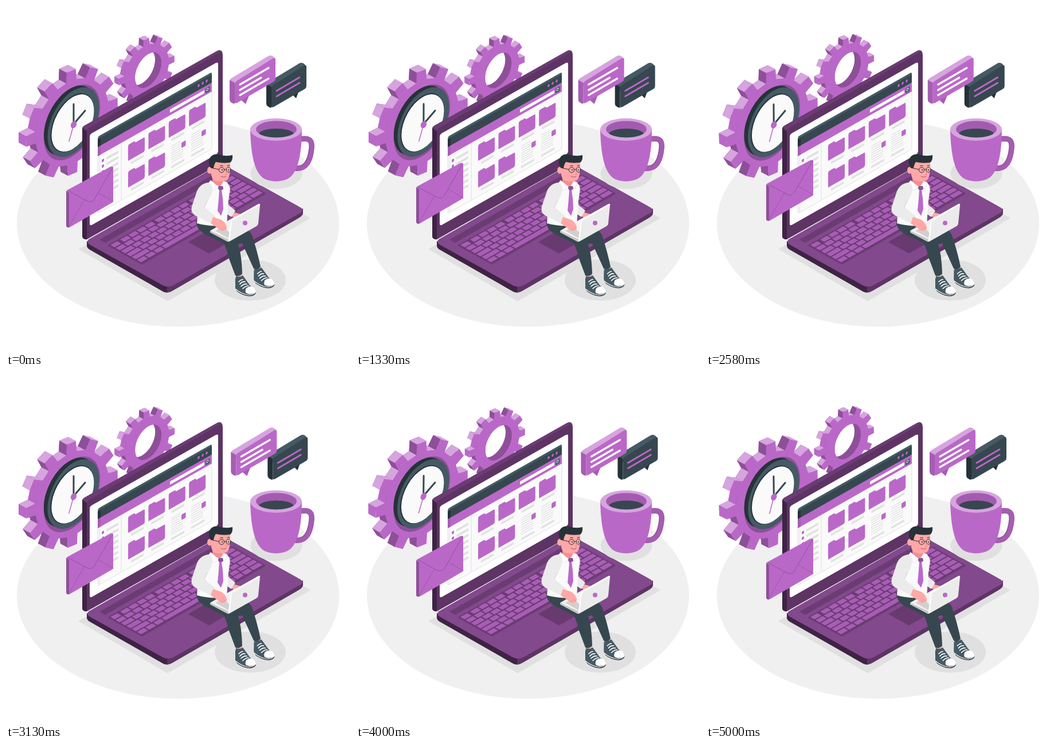
An HTML page for the animation above (5.04 s loop, 600 px wide and 600 px high).

```html
<!DOCTYPE html>
<html lang="en">
<head>
<meta charset="utf-8">
<title>Desk work</title>
<style>
html, body { margin: 0; width: 100%; height: 100%; overflow: hidden; background: #fff; }
svg { display: block; width: 100%; height: 100%; }
</style>
</head>
<body>
<svg id="stage" viewBox="0 0 600 600"></svg>
<script>
const LOOP = 5040;
const C = {
  main: '#ba68c8', light: '#d6a4de', shade: '#8e4f99', plum: '#82498c', deep: '#5d3464', night: '#3f2345',
  slate: '#455a64', ink: '#37474f', black: '#263238', paper: '#fafafa', pale: '#ebebeb', grey: '#e0e0e0',
  skin: '#ffa8a7'
};

const path = (d, fill, extra = '') => `<path d="${d}" fill="${fill}" ${extra}/>`;
const line = (d, color, width = 1, extra = '') =>
  path(d, 'none', `stroke="${color}" stroke-width="${width}" stroke-linecap="round" stroke-linejoin="round" ${extra}`);
const poly = (pts, fill) => `<polygon points="${pts}" fill="${fill}"/>`;
const ellipse = (cx, cy, rx, ry, fill, extra = '') =>
  `<ellipse cx="${cx}" cy="${cy}" rx="${rx}" ry="${ry}" fill="${fill}" ${extra}/>`;
const rect = (x, y, w, h, fill, r = 0, extra = '') =>
  `<rect x="${x}" y="${y}" width="${w}" height="${h}" rx="${r}" fill="${fill}" ${extra}/>`;
const group = (attrs, body) => `<g ${attrs}>${body}</g>`;

// Upright plane facing the lower right, and a disc lying in it
const wall = (x, y, body) => group(`transform="matrix(1 -.567 0 1 ${x} ${y})"`, body);
const disc = (x, y, r, fill) =>
  `<circle r="${r}" fill="${fill}" transform="matrix(1 -.577 0 1.22 ${x} ${y})"/>`;

function gear(cx, cy, scale) {
  const teeth = 12, step = 2 * Math.PI / teeth, outline = [];
  const dx = -13 * scale, dy = -7 * scale;
  for (let i = 0; i < teeth; i++) {
    for (const [r, k] of [[.8, -.27], [1, -.19], [1, .19], [.8, .27]]) {
      const a = -(i + k) * step, c = scale * r * Math.cos(a), s = scale * r * Math.sin(a);
      outline.push([cx + 39 * c - 70 * s, cy - 95 * c - 16 * s]);
    }
  }
  const back = outline.map(([x, y]) => [x + dx, y + dy]);
  const ring = pts => 'M' + pts.map(p => p.map(n => n.toFixed(1)).join(' ')).join('L') + 'Z';
  let flanks = '', rims = '';
  outline.forEach((p, i) => {
    const j = (i + 1) % outline.length, q = outline[j];
    const nx = q[1] - p[1], ny = p[0] - q[0], up = -ny / Math.hypot(nx, ny);
    if (nx * dx + ny * dy <= 0) return;
    const isFlank = i % 2 === 0;
    const fill = up > (isFlank ? .6 : .25) ? C.light : !isFlank && up > -.15 ? C.main : C.shade;
    const face = poly([p, q, back[j], back[i]], fill);
    if (isFlank) flanks += face; else rims += face;
  });
  return path(ring(back), C.shade) + flanks + rims + path(ring(outline), C.main);
}

function ringHole(x, y, r) {
  return `<clipPath id="bore"><circle r="${r}" transform="matrix(1 -.577 0 1.22 ${x} ${y})"/></clipPath>` +
    disc(x, y, r, C.shade) + group('clip-path="url(#bore)"', disc(x - 11, y - 5, r, '#fff'));
}

function clock() {
  return disc(115, 203, 49, C.shade) + disc(111, 199.5, 45, C.black) + disc(117.5, 202.5, 45, C.slate) +
    disc(115.5, 203.5, 38, C.black) + disc(116.5, 204, 37, C.paper) +
    line('M118 206V171', C.ink, 3) + line('M118 206L138 182.5', C.ink, 3) +
    line('M118 207L110 236', C.main, 1.5) + ellipse(118, 207, 4.8, 6.5, C.main, 'transform="rotate(25 118 207)"');
}

function base() {
  let keys = '';
  const indent = [0, 0, 5, 8, 13, 0];
  for (let row = 0; row < 6; row++) {
    for (let s = 14, n = 0; s < 224; n++) {
      let w = n ? 12 : 12 + indent[row];
      if (row === 5 && n === 3) w = 66;
      if (s + w > 215) w = 226 - s;
      keys += rect(s, 27 + 9.3 * row, w, 7.2, '#a85db5', .8);
      s += w + (row === 0 && n % 4 === 0 ? 5 : 2.2);
    }
  }
  return path('M126 424L282 515L531 370L500 352L140 416Z', C.grey) +
    path('M141 410V418Q141 422 146 425L272 497Q276 500 281 500V486Z', C.night) +
    path('M281 486V500Q285 500 290 497L512 369Q518 365 518 361V353Z', C.deep) +
    group('transform="matrix(1 -.571 1 .557 141 410)"',
      rect(-3, -1, 239, 146, C.plum, 9) +
      rect(13, 9, 216, 10, '#6b3c73', 1) +
      rect(11, 25, 217, 60, '#6b3c73', 2) + keys +
      rect(86, 91, 64, 36, '#683a70', 1));
}

const folder = (u, v) =>
  path(`M${u} ${v + 2}V${v + 26}Q${u} ${v + 28} ${u + 2} ${v + 27}H${u + 27}Q${u + 29} ${v + 26} ${u + 29} ${v + 24}` +
    `V${v + 4}Q${u + 29} ${v + 2} ${u + 27} ${v + 2}H${u + 13}L${u + 11} ${v - 1}H${u + 2}Q${u} ${v - 1} ${u} ${v + 2}Z`, C.main) +
  rect(u + 5, v + 32, 22, 3.6, C.grey);

function note(u) {
  let body = rect(u, 136, 23, 3.6, C.grey);
  for (let i = 0; i < 8; i++) body += rect(u, 101 + i * 4, i < 4 ? 17 : 21, 1, '#d5d5d5');
  return body + rect(u + 18, 105, 7.5, 9.5, C.main, 1.5);
}

function screen() {
  let items = '';
  for (let i = 0; i < 7; i++) {
    const v = 56 + i * 9.8;
    items += rect(21, v, 4, 5, C.main, 1.5) + rect(29, v + .5, 21, 4, C.grey);
  }
  let files = '';
  for (let i = 0; i < 4; i++) files += folder(67 + i * 35.4, 57);
  files += folder(67, 103.5) + folder(102.4, 103.5) + note(142) + note(177);
  const dots = [190, 197, 204].map(u => ellipse(u, 22.5, 1.8, 2.5, C.main)).join('');

  return path('M133 216Q132 212 136 209L368 78.5Q378 74 378 86V273L141 407Q133 407 133 401Z', C.deep) +
    path('M133 213L141 218V407Q133 407 133 401Z', C.night) +
    path('M134 212Q134 210 137 209L368 78.5Q373 76 376 79L143 214Q141 216 141 218Z', '#6b3c74') +
    wall(146, 224,
      rect(0, 0, 224, 160, '#fff', 4) +
      rect(14, 42, 199, 104, C.paper, 3, `stroke="${C.grey}"`) +
      rect(14, 44, 5, 101, '#f0f0f0') + rect(54.5, 46, 1, 99, C.grey) +
      items + files +
      rect(14, 28, 199, 18, C.main) + rect(14, 28, 5, 18, '#a65db2') +
      rect(14, 12, 199, 18, C.slate, 3) + rect(18, 16, 195, 14, C.ink) +
      rect(14, 17, 5, 13, C.black) + dots +
      rect(140, 36, 60, 5.5, '#fff', 1) + rect(202, 34.5, 7.5, 8.5, C.slate, 1) +
      ellipse(205.5, 38, 1.7, 2, 'none', 'stroke="#fff" stroke-width=".8"'));
}

function envelope() {
  return path('M105 324Q105 322 107 321L182 280.5Q187 279 187 283V340Q187 342 185 343L111 386Q105 387 105 382Z', C.main) +
    path('M105 323L110 326V386Q105 387 105 382Z', C.shade) +
    line('M110 384L137 337M187 341L161 326', '#9c57a8') +
    line('M109 322.5L141 340Q149 344 154 337L186 281.5', '#9350a0');
}

function bubble(x, y, w, [top, side, front], tail, lines) {
  const right = x + w, dy = y + (80 - w) * .57;
  return poly(tail, side) +
    path(`M${x} ${y + 4}Q${x} ${y} ${x + 3} ${y - 2}L${right - 12} ${dy - 41}` +
      `Q${right - 8} ${dy - 43} ${right - 4} ${dy - 40}L${right} ${dy - 35}L${x + 9} ${y + 12}Z`, top) +
    path(`M${x} ${y + 1}L${x + 9} ${y + 6}V${y + 42}Q${x + 7} ${y + 43} ${x + 4} ${y + 41}` +
      `L${x + 2} ${y + 39.5}Q${x} ${y + 38} ${x} ${y + 35}Z`, side) +
    path(`M${x + 9} ${y + 8}Q${x + 9} ${y + 5} ${x + 12} ${y + 3}L${right - 4} ${dy - 37}Q${right} ${dy - 39} ${right} ${dy - 34}` +
      `V${dy - 1}Q${right} ${dy + 2} ${right - 3} ${dy + 4}L${x + 13} ${y + 41}Q${x + 9} ${y + 43} ${x + 9} ${y + 40}Z`, front) +
    lines;
}

function bubbles() {
  return bubble(454, 135, 70, [C.slate, C.black, C.ink], '497,152 506,161 512,145',
      line('M472 148L512 124.5M472 157.5L512 134', C.main, 2.8)) +
    bubble(390, 128, 80, [C.light, '#a65db2', C.main], '409,163 418,171 424,156',
      line('M408 137L458 108M408 146.5L445 125M408 155.5L458 126.5', '#fff', 3.2));
}

function cup() {
  return ellipse(471.5, 292, 45, 27, C.grey) +
    line('M514 232C529 230 534 234 533 247C531 270 523 285 505 283', C.shade, 9.5) +
    line('M515 232C531 230 534.5 235 533.5 247C532 270 524 285 506 283.5', '#a55db1', 8) +
    path('M426 215C427 262 434 288 447 299C458 308 484 308 495 299C508 288 516 262 516 215Z', C.main) +
    ellipse(471, 215.5, 45, 19.5, C.light) + ellipse(471.5, 215, 35.5, 14.5, '#a35bb0') +
    path('M441 222C449 211 494 211 502 222C493 231.5 450 231.5 441 222Z', C.ink);
}

const shoe = (x, y) => group(`transform="translate(${x} ${y})"`,
  path('M0 5V23Q1 30 8 33Q18 39 28 38Q36 36 36 31L34 33L6 28Z', C.black) +
  path('M1 3L0 21Q1 27 7 30Q18 36 28 34Q36 32 35 27Q33 23 26 20L13 2Q7 6 1 3Z', C.slate) +
  path('M19 24Q26 19 31 22Q37 27 35 31Q30 36 22 34Q15 33 19 24Z', '#fff') +
  line('M6 13Q10 9 13 9M8 17Q12 12 17 13M10 21Q15 16 20 17M13 25Q18 20 23 20', '#fff', 1.7) +
  line('M1 26Q10 34 22 36Q31 37 35 31', '#fff', 1.2));

function legs() {
  return ellipse(426, 478, 62, 36, C.grey) +
    path('M433 451L434 464Q440 466 445 461L443 450Z', C.skin) + shoe(432.5, 454) +
    path('M401 464L402 476Q408 479 413 474L411 462Z', C.skin) + shoe(400, 468) +
    path('M376 390L404 385Q425 389 429 400Q438 426 444 455Q439 461 432 458L412 414Q398 418 385 405Z', C.ink) +
    path('M332 374Q331 389 347 398L380 414Q385 424 388 438L400 470Q406 473 412 467Q411 431 403 409Q398 398 384 388L362 372Z', C.ink);
}

function torso() {
  return path('M398 360L409 363Q413 367 409 370L400 371L390 364Z', C.skin) +
    path('M379 308Q391 309 391 320L387 346L400 357L393 368L378 358Z', C.pale) +
    path('M352 308L383 306Q390 309 389 324L385 382Q358 386 333 379L337 328Q340 311 352 308Z', C.paper) +
    path('M360 297L380 300L379 312Q370 318 360 307Z', '#f28f8f') +
    path('M357 304L371 316L362 322L353 309ZM380 305L385 310L381 320L374 315Z', '#fff', `stroke="${C.grey}" stroke-width=".8"`) +
    path('M371 314L378 314L379 319L376 321Q379 337 379 354L375 366L369 357Q371 338 372 321L370 318Z', C.main) +
    path('M371 314L378 314L379 319L376 321L372 321L370 318Z', C.shade);
}

function head() {
  const frame = `stroke="${C.black}" stroke-width="1"`;
  return path('M358 277Q356 300 363 304Q376 308 385 304Q392 299 391 270L376 263Z', C.skin) +
    path('M358 292Q351 294 351 286Q352 279 359 281Z', C.skin) +
    path('M356 281Q351 270 357 263Q362 257 372 259Q382 263 395 260Q396 269 391 273Q377 275 366 272Q363 276 362 283L358 283Z', C.black) +
    line('M361 283L371 285', C.black) +
    ellipse(376, 286, 4.6, 4.5, 'none', frame) + ellipse(388, 285.5, 3.8, 4.5, 'none', frame) +
    line('M380.5 285H384', C.black) +
    ellipse(377, 286, .9, 1.3, C.black) + ellipse(388, 286, .8, 1.3, C.black) +
    line('M373.5 279Q376 277.5 378.5 279M386 278.5Q388 277 390 278.5', C.black) +
    line('M383 287L385 294L382 294', '#ef8080', .9) + line('M375 297Q380 300 384 297', '#b64b5b');
}

function notebook() {
  return path('M356 392L400 367L437 382L388 411Z', '#f2f2f2') +
    path('M356 392V395L386 411Q389 412 389 409L388 407Z', '#c7c7c7') +
    path('M365 392L379 385L391 396L388 405Z', '#d0d0d0') +
    path('M392 376Q392 373 395 371L440 345.5Q444 344 443 348L440 379Q440 382 437 384L391 410Q387 412 388 408Z', C.pale) +
    path('M392 376Q392 373 395 371L440 345.5Q443 344 443 347L394 375L390 410Q387 412 388 408Z', '#fff') +
    ellipse(417, 378.5, 4, 4, C.main);
}

function arm() {
  return path('M354 308Q339 309 333 323L324 350Q321 360 331 366L357 379L366 367L346 351L357 331Q364 312 354 308Z', C.pale) +
    line('M346 351L351 340', '#cfcfcf') +
    path('M361 368L376 373Q384 379 385 386Q386 391 379 392Q374 393 370 388L357 379Z', C.skin) +
    line('M375 388L379 391M379 386L383 389', '#ef8080', .7);
}

document.getElementById('stage').innerHTML =
  ellipse(300, 379, 281, 180.5, '#f0f0f0') +
  group('id="gears"', gear(245.5, 112.5, .606) + ringHole(248, 112, 23) + gear(115, 203, 1) + clock()) +
  base() + screen() +
  group('id="envelope"', envelope()) +
  group('id="bubbles"', bubbles()) +
  cup() + legs() + torso() + head() + notebook() + arm();

// Linear interpolation through evenly spaced stops
function tween(stops, phase) {
  const pos = (phase % 1) * (stops.length - 1), i = Math.floor(pos);
  return stops[i] + (stops[i + 1] - stops[i]) * (pos - i);
}

const SHAKE = [0, -1.2, 2.4, -4.8, 4.8, -4.8, 4.8, -4.8, 2.4, -1.2, 0];
const FLOAT = [0, -12, 0];
const SWAY = [0, 1, 0, -1, 0];
const gears = document.getElementById('gears');
const letter = document.getElementById('envelope');
const chat = document.getElementById('bubbles');

function update(t) {
  gears.setAttribute('transform', `rotate(${tween(SWAY, t / 3000)} 158 176)`);
  letter.setAttribute('transform', `translate(0 ${tween(FLOAT, t / 5000)})`);
  chat.setAttribute('transform', `translate(${tween(SHAKE, t / 5000)} 0)`);
}

const start = performance.now();
function tick() {
  update((performance.now() - start) % LOOP);
  requestAnimationFrame(tick);
}
tick();
</script>
</body>
</html>
```
